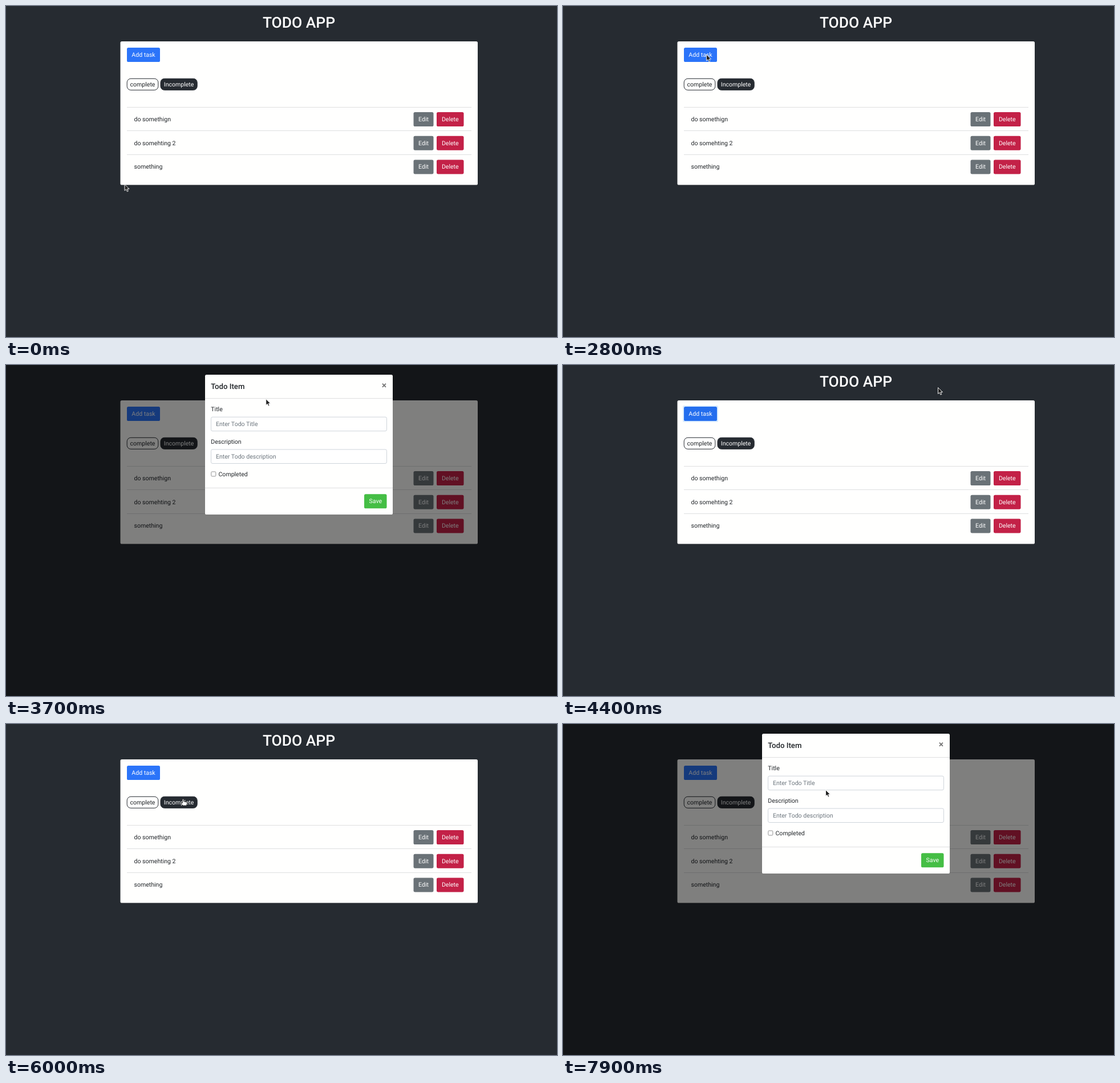
Recreate the animation shown at these times as an HTML page. Size 966 px wide and 580 px high, loop 8000 ms.

```html
<!DOCTYPE html>
<html lang="en">
<head>
<meta charset="utf-8">
<title>Todo app</title>
<style>
  html, body { margin: 0; width: 100%; height: 100%; overflow: hidden; background: #262b31; }
  svg { display: block; }
  text { font: 10.56px Roboto, sans-serif; fill: #212529; text-rendering: geometricPrecision; white-space: pre; }
  .mid { text-anchor: middle; }
  .light { fill: #fff; }
  .hint { fill: #6c757d; }
  .h1 { font-size: 26.4px; font-weight: 500; }
  .h5 { font-size: 13.2px; font-weight: 500; }
  .close { font-size: 15.8px; font-weight: 700; fill: #777; }
  .tab rect { fill: none; stroke: #262b31; }
  .tab.on rect { fill: #262b31; }
  .tab.on text { fill: #fff; }
</style>
</head>
<body>
<svg id="stage" width="966" height="580" viewBox="0 0 966 580"></svg>
<script>
const $ = id => document.getElementById(id);
const box = (x, y, w, h, fill, extra = '') =>
  `<rect x="${x}" y="${y}" width="${w}" height="${h}" rx="2.6" fill="${fill}" ${extra}/>`;
const label = (x, y, str, cls = '') => `<text x="${x}" y="${y}" class="${cls}">${str}</text>`;
const button = (x, y, w, str, fill, extra) =>
  box(x, y, w, 25, fill, extra) + label(x + w / 2, y + 15.8, str, 'mid light');
const rule = (x, y, w) => `<path d="M${x} ${y}h${w}" stroke="#dedfe0"/>`;
const tab = (id, x, w, str) => `<g id="${id}" class="tab">
  <rect x="${x}" y="127.3" width="${w}" height="20" rx="6.6"/>${label(x + w / 2, 141, str, 'mid')}</g>`;
const input = (y, str) =>
  box(359.5, y, 308, 24.5, '#fff', 'stroke="#ced4da"') + label(368, y + 16, str, 'hint');

const rows = ['do somethign', 'do somehting 2', 'something'].map((name, i) => {
  const y = 177.5 + i * 41.7;
  return rule(212, Math.round(y) - .5, 604) + label(224.5, y + 24.5, name) +
    button(714.5, y + 8.5, 35, 'Edit', '#6a7277') + button(755, y + 8.5, 47.5, 'Delete', '#c32147');
}).join('');

$('stage').innerHTML = `
  <rect width="966" height="580" fill="#262b31"/>
  ${label(513.5, 38.3, 'TODO APP', 'h1 mid light')}
  ${box(200.5, 62, 626.5, 251.5, '#fffffe', 'id="card"')}
  ${box(209.9, 70.9, 62.2, 29.2, '#268fff', 'id="ring"')}
  ${button(212, 73, 58, 'Add task', '#2b74f9', 'id="add"')}
  ${tab('complete', 212.2, 54.6, 'complete')}
  ${tab('incomplete', 271, 64.2, 'Incomplete')}
  <g id="rows">${rows}</g>
  <rect id="backdrop" width="966" height="580"/>
  <g id="modal">
    ${box(349, 17, 329, 245, '#fffffe')}
    ${label(359.3, 42.3, 'Todo Item', 'h5')}
    ${label(663, 41, '×', 'close mid')}
    ${rule(349, 58.5, 329)}
    ${label(359.3, 80.7, 'Title')}
    ${input(91.2, 'Enter Todo Title')}
    ${label(359.3, 137.5, 'Description')}
    ${input(148, 'Enter Todo description')}
    <rect x="359.8" y="187" width="8" height="8" rx="1.5" fill="#fff" stroke="#767676" stroke-width=".8"/>
    ${label(372.5, 194.6, 'Completed')}
    ${rule(349, 215.5, 329)}
    ${button(628, 226.3, 39.5, 'Save', '#45be45')}
  </g>
  <path id="cursor" stroke-linejoin="round" stroke-width=".9"/>`;

const shapes = {
  arrow: ['M0 0V11L2.6 8.7 4.4 12.6 6.3 11.8 4.6 8H8Z', '#222', '#fff'],
  hand: ['M-1.3 6V.8Q0-.6 1.2.8V4.2L6 5.3Q7.5 5.8 7 8L6 11.5H-.5L-4 7.5Q-3.6 5.8-1.3 7.2Z', '#fff', '#222'],
  beam: ['M-2-5.5Q0-5.5 0-4.5Q0-5.5 2-5.5M0-4.5V4.5M-2 5.5Q0 5.5 0 4.5Q0 5.5 2 5.5', 'none', '#222']
};

// Pointer path: time, x, y, shape from that time on
const path = [
  [0, 208, 312.5, 'arrow'], [700, 208, 312.5, 'arrow'], [800, 231, 279, 'arrow'], [900, 231, 279, 'arrow'],
  [1200, 356, 173, 'arrow'], [1400, 295, 201, 'arrow'], [1500, 295, 201, 'arrow'], [1700, 470.5, 186, 'arrow'],
  [1900, 637, 155, 'arrow'], [2000, 637, 155, 'arrow'], [2500, 251.5, 85, 'hand'], [2800, 251.5, 85, 'arrow'],
  [3400, 251.5, 85, 'arrow'], [4000, 660, 34, 'arrow'], [4300, 663, 35, 'arrow'], [4400, 657.5, 39.5, 'arrow'],
  [4900, 245, 132, 'hand'], [5700, 245, 132, 'hand'], [5800, 312, 132, 'hand'], [6000, 310.5, 131.5, 'hand'],
  [6100, 303, 123, 'arrow'], [6500, 250, 85, 'hand'], [6700, 250, 85, 'hand'], [6800, 252, 86, 'arrow'],
  [7200, 393.5, 118.5, 'beam'], [7300, 415, 119, 'arrow'], [7500, 435, 120, 'arrow'],
  [7600, 435, 120, 'arrow'], [7900, 460.5, 115.5, 'arrow']
];

const clamp = v => Math.min(1, Math.max(0, v));

function pointer(t) {
  const next = path.findIndex(p => p[0] > t);
  if (next < 0) return path[path.length - 1].slice(1);
  const [t0, x0, y0, kind] = path[next - 1], [t1, x1, y1] = path[next];
  const k = (t - t0) / (t1 - t0);
  return [x0 + (x1 - x0) * k, y0 + (y1 - y0) * k, kind];
}

function draw(t) {
  const opened = t >= 4400 ? 7117 : 2817;
  const age = t - opened;
  $('backdrop').setAttribute('opacity', clamp(age / 150) / 2);
  $('modal').setAttribute('opacity', clamp((age - 150) / 150));
  const slide = -33 * (1 - clamp((age - 150) / 300)) ** 1.7;
  $('modal').setAttribute('transform', `translate(0 ${slide})`);

  const done = t >= 5100 && t < 6000;
  $('complete').classList.toggle('on', done);
  $('incomplete').classList.toggle('on', !done);
  $('rows').setAttribute('visibility', done ? 'hidden' : 'visible');
  $('card').setAttribute('height', done ? 126.5 : 251.5);

  const [x, y, kind] = pointer(t);
  const focus = t >= 4400 && t < 5100 ? clamp((t - 4350) / 150) : 0;
  const hover = kind === 'hand' && y < 98;
  const dark = hover ? 1 : focus;
  $('ring').setAttribute('opacity', focus / 2);
  $('add').setAttribute('fill', `rgb(${43 - 22 * dark},${116 - 18 * dark},${249 - 33 * dark})`);

  const [d, fill, stroke] = shapes[kind];
  const attrs = { d, fill, stroke, transform: `translate(${x} ${y})` };
  for (const name in attrs) $('cursor').setAttribute(name, attrs[name]);
}

// The screen updates ten times a second
function tick() {
  draw(Math.floor(performance.now() % 8000 / 100) * 100);
  requestAnimationFrame(tick);
}
tick();
</script>
</body>
</html>
```
